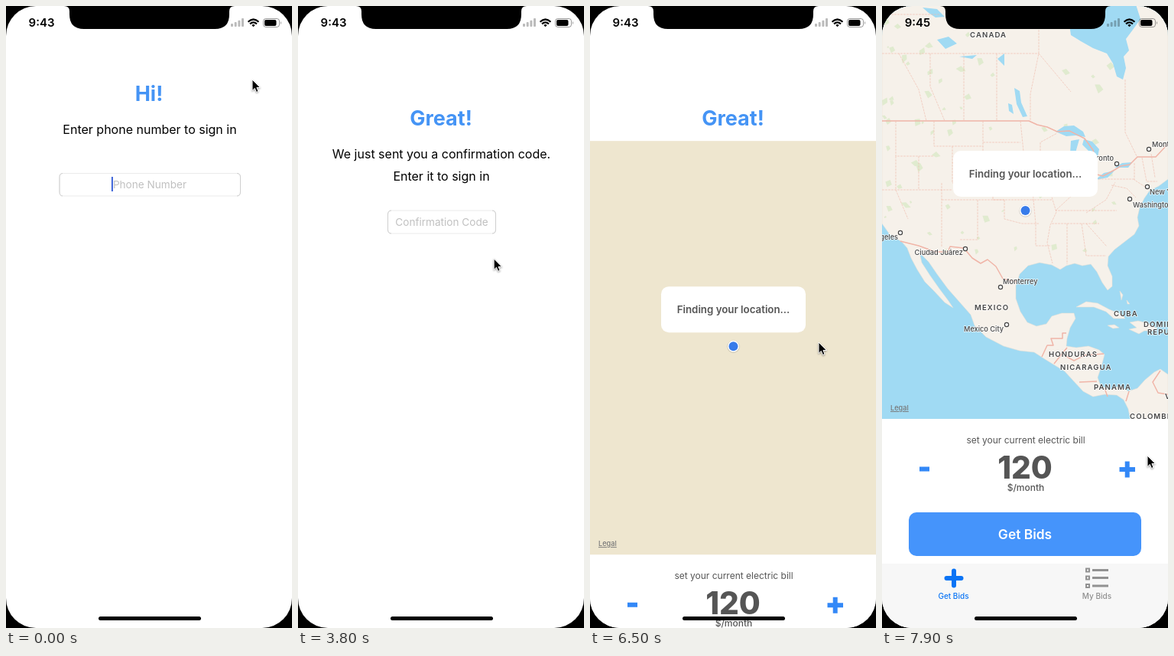
Write an HTML page that moves like this. It is 374x812 px and loops after 8000 ms.

```html
<!DOCTYPE html>
<html lang="en">
<head>
<meta charset="utf-8">
<title>Sign in and get bids</title>
<style>
html, body { margin: 0; width: 100%; height: 100%; overflow: hidden; background: #000; }
svg { display: block; width: 374px; height: 812px; }
text { font-family: Inter, "Noto Sans", sans-serif; text-anchor: middle; }
.title { font-size: 27px; font-weight: 700; fill: #4594f5; }
.body { font-size: 16px; }
.input { font-size: 13.6px; }
.hint { fill: #c0c0c0; }
.caret { fill: #3b62d8; }
.field rect { fill: #fff; stroke: #ebebeb; }
.field path { fill: none; stroke: #cfcfcf; }
.grey { fill: #555; }
.semi { font-weight: 600; }
.tab { font-size: 10px; font-weight: 500; }
.land { fill: #f6f1ea; stroke: #e6dfd2; stroke-width: .5; }
.water { fill: #a0daf3; }
.line { fill: none; stroke: #efb9aa; stroke-width: .6; stroke-dasharray: 3 1; }
.border { fill: none; stroke: #f0b5a8; stroke-width: 1.5; stroke-linejoin: round; }
.country { font-size: 9.6px; font-weight: 600; letter-spacing: 1.1px; fill: #444; }
.city { font-size: 9.2px; font-weight: 500; fill: #444; }
.country, .city { paint-order: stroke; stroke: #fffc; stroke-width: 1.5px; }
.start { text-anchor: start; }
.end { text-anchor: end; }
#cities circle { fill: #fff; stroke: #444; stroke-width: 1.2; }
#pointer { filter: drop-shadow(0 1px 1px #0006); }
</style>
</head>
<body>
<svg viewBox="0 0 374 812">
  <defs>
    <clipPath id="screen"><rect width="374" height="812" rx="39"/></clipPath>
    <clipPath id="mapArea"><rect width="374" height="540"/></clipPath>
    <path id="coast" d="M0-5H374V226L362 235L350 241L343 251L337 263L334 276L336 287L330 298L317 308L304 318L296 327L295 339L301 353L301 366L295 371L288 361L281 347L273 337L262 339L252 336L241 339L233 344L222 338L206 335L191 339L180 350L175 365L175 382L181 399L190 413L202 418L215 415L222 405L235 401L251 401L253 408L246 420L242 434L241 444L254 446L270 444L284 449L291 455L287 470L282 485L286 496L298 501L311 496L322 503L334 499L344 488L356 478L364 474L374 481V545H326L322 526L316 514L307 508L291 507L276 510L263 503L250 489L239 477L226 469L213 461L199 452L180 450L159 444L136 432L121 417L116 403L101 386L86 369L72 350L61 334L49 322L52 335L63 352L75 369L87 385L93 394L82 387L68 372L56 360L46 344L38 329L33 316L26 308L10 298L0 284Z"/>
    <clipPath id="onLand"><use href="#coast"/></clipPath>
  </defs>
  <g clip-path="url(#screen)">
    <rect width="374" height="812" fill="#fff"/>

    <g id="phonePage">
      <text class="title" x="187" y="124">Hi!</text>
      <text class="body" x="188" y="166.5">Enter phone number to sign in</text>
      <g class="field">
        <rect x="70" y="218.500" width="236.500" height="29.500" rx="5"/>
        <path d="M74 218.500Q70 218.500 70 223V243Q70 248 74 248M302 218.500Q306.500 218.500 306.500 223V243Q306.500 248 302 248"/>
      </g>
      <text class="input" x="188" y="237.500"></text>
      <rect class="caret" y="223" width="2" height="19"/>
    </g>

    <g id="codePage">
      <text class="title" x="187" y="156">Great!</text>
      <g id="codeForm">
        <text class="body" x="187.500" y="198.500">We just sent you a confirmation code.</text>
        <text class="body" x="187.500" y="228">Enter it to sign in</text>
        <g class="field">
          <rect x="117.500" y="267" width="141" height="30" rx="5"/>
          <path d="M122 267Q117.500 267 117.500 272V292Q117.500 297 122 297M254 267Q258.500 267 258.500 272V292Q258.500 297 254 297"/>
        </g>
        <text class="input" x="188" y="286.500"></text>
        <rect class="caret" y="272" width="2" height="19"/>
      </g>
    </g>

    <g id="sheet">
      <rect width="374" height="900" fill="#fff"/>
      <rect width="374" height="540" fill="#eee6cf"/>
      <g id="map" clip-path="url(#mapArea)">
        <rect class="water" width="374" height="540"/>
        <g transform="translate(0 1)">
          <use class="land" href="#coast"/>
          <g id="parks" clip-path="url(#onLand)" fill="#d9e8c6" opacity=".75"></g>
          <g class="land">
            <path d="M254 393L267 386L282 388L297 396L314 403L318 408L303 408L293 399L277 393Z"/>
            <path d="M324 413L335 411L347 414L360 421L353 424L343 424L336 428L323 422L333 420Z"/>
            <path d="M295 417L304 416L310 420L302 421ZM311 372L315 377L313 384ZM320 384L324 389L321 389Z"/>
          </g>
          <g class="water">
            <path d="M230-2L236 13L245 24L247 38L260 46L276 55L294 62L302 75L307 92L315 96L319 81L316 66L323 58L319 43L328 31L338 17L332-2Z"/>
            <path d="M227 164L238 157L251 156L263 164L266 171L253 169L241 170Z"/>
            <path d="M247 176L258 174L254 188L251 212L245 210ZM264 174L275 177L284 187L281 202L272 203L271 190L262 181Z"/>
            <path d="M279 227L290 218L304 215L295 224ZM304 211L314 205L327 204L322 211Z"/>
            <path d="M173 107L180 111L182 126L190 144L184 145L176 128ZM165 127L170 129L172 141L166 137Z"/>
            <path d="M53 2L72 4L82 14L70 15L61 9ZM72 44L87 40L98 49L83 56ZM101 66L124 64L118 69ZM151 69L160 62L160 78Z"/>
          </g>
          <path class="line" d="M0 11H75M0 62H205M22 62L48 109L58 150M63 62V105L82 150M107 62V150M150 62V150M205 -5V62L194 115V150M205 62L247 112M318 96V165L334 198M18 150V196H68M18 196V240L34 278M68 150V183H132M92 183V231M48 196V240M0 240H92M78 231V314M132 150V205H92M92 231H145M132 205H192M145 205V253H195M78 253H160M125 253V305H102M160 253V278L183 284H205M132 178H181M181 150L185 190L195 213L198 253M186 220H217M195 253H222M198 253L201 284V313H221M221 246L228 269L220 286L216 309L223 336M222 246L217 218L207 200V178L229 166M231 213V247M252 213V244L227 267H307M222 284H284M242 284V337M261 284L267 326H293M267 284L294 314M267 270L293 253L305 230M276 213V247M283 226H330M300 234L320 238L332 250M330 205V227L344 236M340 198L346 229H360M352 193L357 224"/>
          <path class="border" d="M0 150H192L203 155L216 158L229 164L245 163L265 173L276 188L280 205L277 219L289 222L304 214L312 209L324 207L334 197H358L374 180"/>
          <path class="border" d="M24 307L48 313L70 321H86L89 314L107 316L118 329L129 336L138 331L149 340L158 356L176 360M209 458L216 443H224L221 434H236V427H241M225 467L237 452L242 446M240 457L251 463L265 456L290 454M258 491L281 490M291 499L295 510M323 503L319 516M364 476L354 491L361 505L374 507"/>
          <g id="countries"></g>
          <g id="cities"></g>
        </g>
      </g>
      <rect x="93" y="190" width="189" height="60" rx="10" fill="#fff"/>
      <text class="grey semi" x="187.500" y="225" font-size="13.300">Finding your location...</text>
      <circle cx="187.500" cy="268.500" r="8.200" fill="#0002"/>
      <circle cx="187.500" cy="268" r="7.500" fill="#fff"/>
      <circle cx="187.500" cy="268" r="6" fill="#377bea"/>
      <text class="start" x="11" y="529" font-size="9.200" font-weight="500" fill="#777" text-decoration="underline">Legal</text>

      <text class="grey" x="188" y="572" font-size="12">set your current electric bill</text>
      <text class="grey" x="187" y="618" font-size="40.500" font-weight="800">120</text>
      <text class="grey" x="188" y="634" font-size="12" font-weight="500">$/month</text>
      <path d="M49 605.500H62M310.500 606H331M320.700 595.500V616.500" stroke="#3388f7" stroke-width="6"/>
      <rect x="35" y="662" width="304" height="57" rx="10" fill="#4594fb"/>
      <text class="semi" x="187" y="696.500" font-size="17.400" fill="#fff">Get Bids</text>

      <rect y="729" width="374" height="120" fill="#f7f7f7"/>
      <path d="M84.500 748H103.500M94 738.500V757.500" stroke="#0a74f5" stroke-width="6" stroke-linecap="round"/>
      <text class="tab" x="93.500" y="775" fill="#0a74f5">Get Bids</text>
      <g fill="none" stroke="#929292" stroke-width="2">
        <path d="M267 735.500h4v4h-4zM267 745.500h4v4h-4zM267 756h4v4h-4z"/>
        <path d="M275 737.500H296M275 747.500H296M275 758H296" stroke-width="3"/>
      </g>
      <text class="tab" x="281" y="775" fill="#8e8e8e">My Bids</text>
    </g>

    <text id="clock" class="semi" x="46.500" y="27" font-size="15">9:43</text>
    <g fill="#0004">
      <rect x="294" y="23" width="3" height="4" rx="1"/>
      <rect x="298.700" y="21" width="3" height="6" rx="1"/>
      <rect x="303.400" y="18.700" width="3" height="8.300" rx="1"/>
      <rect x="308" y="16" width="3" height="11" rx="1"/>
    </g>
    <g fill="none" stroke="#000" stroke-width="2.200">
      <path d="M316.500 20.700Q323.500 14.300 330.500 20.700M319 23.300Q323.500 19.500 328 23.300"/>
      <path d="M321.300 25Q323.500 23 325.700 25L323.500 27.300Z" fill="#000" stroke="none"/>
    </g>
    <rect x="336.500" y="16.500" width="21" height="11" rx="3.300" fill="none" stroke="#0006"/>
    <rect x="338" y="18" width="15.500" height="8" rx="2"/>
    <path d="M359 20Q361 22 359 24Z" fill="#0006"/>
    <path d="M76-1H299V0Q292 0 292 7V11Q292 30 273 30H102Q83 30 83 11V7Q83 0 76 0Z"/>
    <rect x="121" y="797" width="134" height="5" rx="2.500"/>
  </g>
  <path id="pointer" d="M0 0V14.500L3.300 11.400L5.500 16.500L8 15.400L5.900 10.500H10.400Z" stroke="#fff" stroke-width="1" stroke-linejoin="round"/>
</svg>
<script>
const LOOP = 8000;
const $ = selector => document.querySelector(selector);

function add(parent, tag, attributes, text = "") {
  const node = document.createElementNS("http://www.w3.org/2000/svg", tag);
  for (const name in attributes) node.setAttribute(name, attributes[name]);
  node.textContent = text;
  parent.append(node);
}

// Map labels
[["CANADA", 115, 41], ["MEXICO", 121, 397], ["CUBA", 303, 405], ["HONDURAS", 218, 458],
 ["NICARAGUA", 233, 475], ["PANAMA", 277, 501], ["COLOMBIA", 324, 539],
 ["DOMINICAN", 342, 419], ["REPUBLIC", 347, 429], ["VENEZUELA", 370, 513]
].forEach(([name, x, y]) => add($("#countries"), "text", { class: "country start", x, y }, name));

[["Los Angeles", 24, 296, 21, 305, "end"], ["Ciudad Juárez", 109, 317, 106, 325, "end"],
 ["Monterrey", 155, 367, 158, 363, "start"], ["Mexico City", 163, 416, 159, 425, "end"],
 ["Toronto", 307, 206, 303, 202, "end"], ["Montreal", 349, 187, 353, 184, "start"],
 ["New York", 347, 236, 350, 246, "start"], ["Washington", 324, 252, 328, 263, "start"]
].forEach(([name, cx, cy, x, y, side]) => {
  add($("#cities"), "circle", { cx, cy, r: 2.6 });
  add($("#cities"), "text", { class: "city " + side, x, y }, name);
});

// Scattered parkland, denser in the west
let seed = 11;
const random = () => (seed = seed * 16807 % 2147483647) / 2147483647;
for (let i = 0; i < 75; i++) {
  const x = 300 * random() ** 1.8, y = 320 * random(), size = 2 + 5 * random();
  add($("#parks"), "path", {
    d: `M${x} ${y}l${size} ${-size * random()}l${size * random()} ${size}l${-size} ${size * random()}z`
  });
}

const clamp = v => Math.min(1, Math.max(0, v));
const smooth = v => v * v * (3 - 2 * v);

const pointerPath = [
  [0, 322, 96], [500, 322, 96], [1300, 222, 226], [3580, 222, 226], [4050, 297, 454],
  [4400, 309, 396], [4600, 309, 396], [5250, 299, 439], [7200, 299, 439], [7900, 347, 587], [8000, 347, 587]
];

function pointerAt(t) {
  const i = pointerPath.findIndex(([time]) => time > t);
  const [t0, x0, y0] = pointerPath[i - 1], [t1, x1, y1] = pointerPath[i];
  const k = smooth((t - t0) / (t1 - t0));
  return [x0 + (x1 - x0) * k, y0 + (y1 - y0) * k];
}

function blink(t) {
  const p = t % 1100;
  return p < 500 ? 1 - clamp((p - 100) / 200) : clamp((p - 480) / 150);
}

function input(page, hint, value, keyTimes) {
  const text = $(page + " .input"), caret = $(page + " .caret");
  return (t, caretOpacity) => {
    const typed = keyTimes.filter(time => time <= t).length;
    const content = typed ? value.slice(0, typed) : hint;
    if (text.textContent !== content) text.textContent = content;
    text.classList.toggle("hint", !typed);
    const half = text.getComputedTextLength() / 2;
    caret.setAttribute("x", typed ? 187.5 + half : 187 - half - 1);
    caret.setAttribute("opacity", caretOpacity);
  };
}

const phone = input("#phonePage", "Phone Number", "555010147",
  [1580, 1830, 2080, 2280, 2480, 2780, 2980, 3180, 3380]);
const code = input("#codePage", "Confirmation Code", "8678", [5430, 5630, 5830, 5980]);

const show = (selector, on) => $(selector).style.display = on ? "" : "none";
const move = (selector, x, y) => $(selector).setAttribute("transform", `translate(${x} ${y})`);

function draw(t) {
  const codeStart = 3580, sheetStart = 6343, mapStart = 7480;
  const loaded = t >= mapStart;

  show("#phonePage", t < codeStart);
  show("#codePage", t >= codeStart);
  if (t < codeStart) phone(t, t < 1570 ? blink(t) : 1);
  else code(t, t < 4480 ? 0 : t < 5420 ? blink(t - 4000) : 1 - clamp((t - 6080) / 180));

  // Critically damped spring brings the sheet up
  const s = 18.26 * (t - sheetStart) / 1000;
  show("#sheet", s > 0);
  show("#codeForm", s < 2);
  move("#sheet", 0, loaded ? -1 : s > 0 ? 812 * (1 + s) * Math.exp(-s) : 812);
  show("#map", loaded);
  $("#clock").textContent = loaded ? "9:45" : "9:43";

  move("#pointer", ...pointerAt(t));
}

const start = performance.now();
function tick() {
  draw((performance.now() - start) % LOOP);
  requestAnimationFrame(tick);
}
tick();
</script>
</body>
</html>
```
